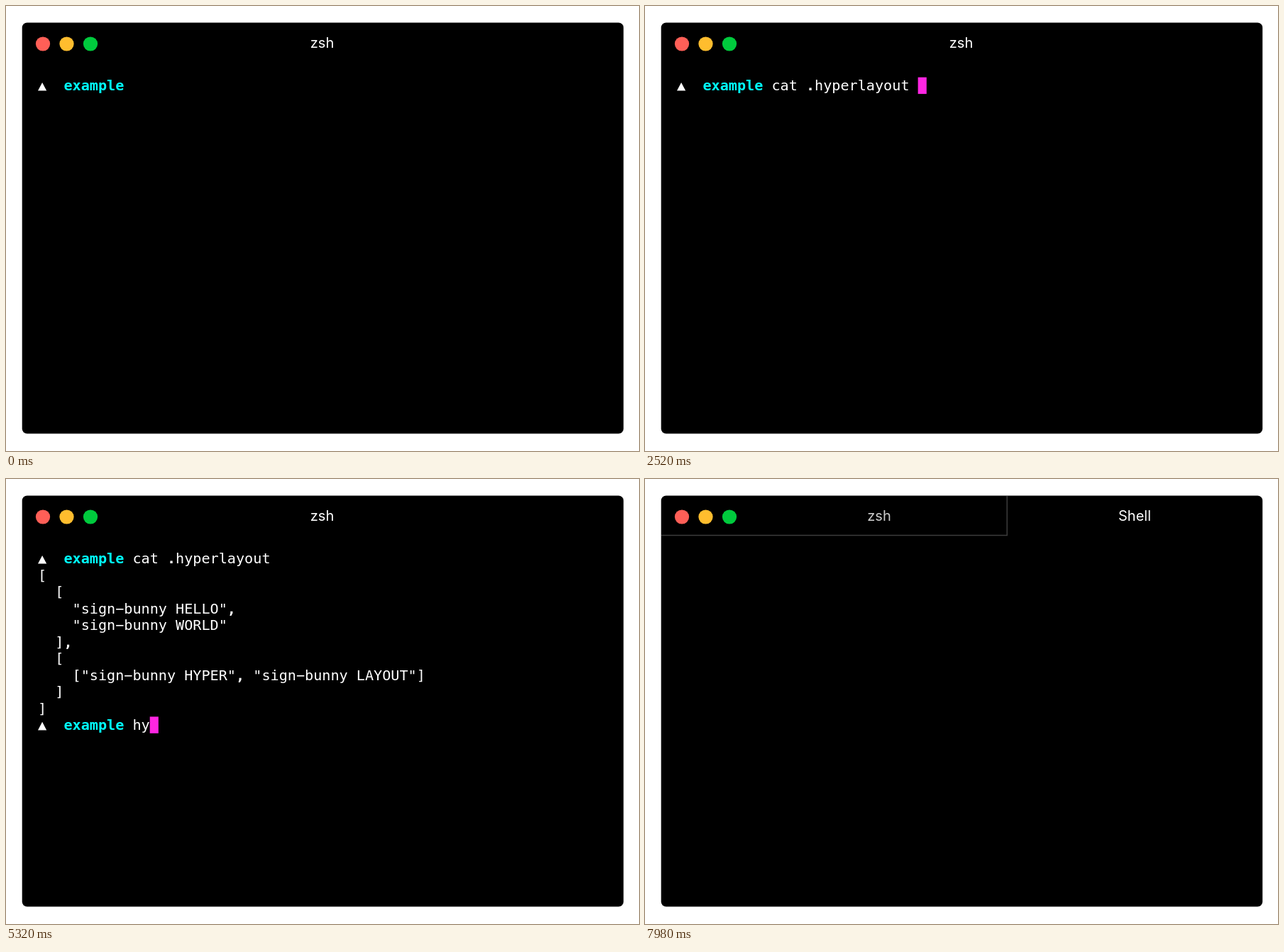
These frames come from a looping animation (892x628 px, 8000 ms). An HTML page with a canvas:

```html
<!DOCTYPE html>
<html lang="en">
<head>
<meta charset="utf-8">
<title>zsh</title>
<style>
html, body { margin: 0; width: 100%; height: 100%; overflow: hidden; background: #fff; }
canvas { display: block; }
</style>
</head>
<body>
<canvas id="stage" width="892" height="628"></canvas>
<script>
const ctx = document.getElementById('stage').getContext('2d');
const LOOP = 8000;
const LEFT = 45, TOP = 100.6, CELL = 12.13, ROW = 23.48, BASE = 18.7;
const MONO = '20.15px "DejaVu Sans Mono", monospace';
const PROMPT = 11;
const OUTPUT_AT = 3220, ENTER_AT = 7560, TAB_AT = 7840;

const output = [
  '[',
  '  [',
  '    "sign-bunny HELLO",',
  '    "sign-bunny WORLD"',
  '  ],',
  '  [',
  '    ["sign-bunny HYPER", "sign-bunny LAYOUT"]',
  '  ]',
  ']'
];

// [time, text typed so far]; the jump to the full name is a tab completion
const firstKeys = [
  [1120, 'c'], [1260, 'ca'], [1400, 'cat'], [1610, 'cat '], [1890, 'cat .'],
  [2170, 'cat .h'], [2310, 'cat .hy'], [2450, 'cat .hyp'], [2520, 'cat .hyperlayout ']
];
const secondKeys = [4970, 5180, 5600, 5880, 6160, 6300, 6440, 6580, 6720, 6860, 7000]
  .map((at, i) => [at, 'hyperlayout'.slice(0, i + 1)]);

const typed = (keys, t) => keys.reduce((text, [at, s]) => t >= at ? s : text, '');
const ramp = (t, from, to) => Math.min(1, Math.max(0, (t - from) / (to - from)));

// Blinking: hard off, slow fade in, solid while typing
function cursorAlpha(t) {
  if (t < 840) return ramp(t, 20, 350);
  if (t < 1120) return 0;
  if (t >= 3710 && t < 4970) return ramp(t, 4130, 4440);
  return 1;
}

function write(text, col, row, color = '#fff', bold = false) {
  ctx.fillStyle = color;
  ctx.textAlign = 'left';
  [...text].forEach((c, i) => {
    ctx.font = (bold || c === '.' || c === ',' ? 'bold ' : '') + MONO;
    // the wide dash sits at the height of a minus sign
    ctx.fillText(c === '-' ? '\u2212' : c, LEFT + (col + i) * CELL, TOP + row * ROW + BASE);
  });
}

function prompt(row, text) {
  const y = TOP + row * ROW;
  ctx.fillStyle = '#fff';
  ctx.beginPath();
  ctx.moveTo(51.1, y + 7.3);
  ctx.lineTo(57.2, y + 19);
  ctx.lineTo(45, y + 19);
  ctx.fill();
  write('example', 3, row, '#0ff', true);
  write(text, PROMPT, row);
}

function cursor(col, row, alpha) {
  const x = col === PROMPT ? 177.5 : LEFT + col * CELL;
  ctx.globalAlpha = alpha;
  ctx.fillStyle = '#ff26e2';
  ctx.fillRect(x, TOP + row * ROW, LEFT + (col + 1) * CELL - x, ROW);
  ctx.globalAlpha = 1;
}

function title(text, x, color) {
  ctx.font = '20px Inter, sans-serif';
  ctx.textAlign = 'center';
  ctx.fillStyle = color;
  ctx.fillText(text, x, 59);
}

function frame(t) {
  ctx.fillStyle = '#fff';
  ctx.fillRect(0, 0, 892, 628);
  ctx.fillStyle = '#000';
  ctx.beginPath();
  ctx.roundRect(22.7, 23.5, 847.5, 580, 7);
  ctx.fill();
  ['#ff5f57', '#ffbd2e', '#00ca3d'].forEach((color, i) => {
    ctx.fillStyle = color;
    ctx.beginPath();
    ctx.arc(52 + i * 33.5, 53.5, 10.1, 0, 7);
    ctx.fill();
  });

  if (t >= TAB_AT) {
    ctx.strokeStyle = '#3c3c3c';
    ctx.lineWidth = 1.5;
    ctx.beginPath();
    ctx.moveTo(23, 79.5);
    ctx.lineTo(510.2, 79.5);
    ctx.lineTo(510.2, 24);
    ctx.stroke();
    title('zsh', 330, '#ccc');
    title('Shell', 690, '#fff');
    return;
  }

  title('zsh', 445.5, '#fff');
  const first = typed(firstKeys, t), second = typed(secondKeys, t);
  prompt(0, first);
  if (t < OUTPUT_AT) {
    cursor(PROMPT + first.length, 0, cursorAlpha(t));
    return;
  }
  output.forEach((line, i) => write(line, 0, i + 1));
  prompt(10, second);
  if (t < ENTER_AT) cursor(PROMPT + second.length, 10, cursorAlpha(t));
  else cursor(0, 11, 1);
}

const start = performance.now();
function tick() {
  frame((performance.now() - start) % LOOP);
  requestAnimationFrame(tick);
}
tick();
</script>
</body>
</html>
```
